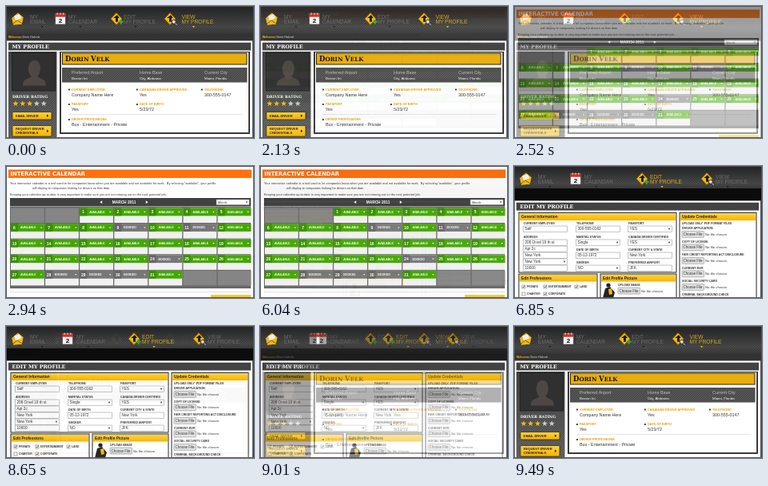
Write an HTML page that moves like this. It is 310 px wide and 165 px high and loops after 9520 ms.

```html
<!DOCTYPE html>
<html lang="en">
<head>
<meta charset="utf-8">
<title>Driver portal</title>
<style>
html, body { margin: 0; width: 100%; height: 100%; overflow: hidden; background: #fff; }
svg { display: block; width: 100vw; height: 100vh; }
text { font-family: Arial, "Liberation Sans", sans-serif; white-space: pre; }
.b { font-weight: bold; }
.slab { font-family: "DejaVu Serif", "Noto Serif", serif; font-weight: bold; }
.wide { font-family: "DejaVu Sans", sans-serif; font-weight: bold; }
</style>
</head>
<body>
<svg id="stage" viewBox="0 0 310 165" preserveAspectRatio="none"></svg>
<script>
const GOLD = '#f5b810', INK = '#333';

const rect = (x, y, w, h, fill, extra = '') =>
  `<rect x="${x}" y="${y}" width="${w}" height="${h}" fill="${fill}" ${extra}/>`;
const path = (d, fill, extra = '') => `<path d="${d}" fill="${fill}" ${extra}/>`;
const esc = s => String(s).replace(/&/g, '&amp;');
// Text is placed by its left edge and the middle of its capitals.
const text = (x, y, size, s, fill = INK, cls = '', extra = '') =>
  `<text x="${x}" y="${y + size * .36}" font-size="${size}" fill="${fill}" class="${cls}" ${extra}>${esc(s)}</text>`;
const label = (x, y, s, fill = INK, size = 3.6) => text(x, y, size, s, fill, 'b');
const arrow = (x, y, size, fill, turn = 0) =>
  path(`M${-size} ${-size * .6}H${size}L0 ${size * .8}Z`, fill, `transform="translate(${x} ${y}) rotate(${turn})"`);

const defs = `<defs>
  <linearGradient id="head" x2="0" y2="1">
    <stop stop-color="#242424"/><stop offset=".75" stop-color="#4a4a4a"/><stop offset="1" stop-color="#3a3a3a"/>
  </linearGradient>
  <linearGradient id="gold" x2="0" y2="1"><stop stop-color="#ffd23c"/><stop offset="1" stop-color="#f5b400"/></linearGradient>
  <linearGradient id="slate" x2="0" y2="1"><stop stop-color="#444"/><stop offset="1" stop-color="#666"/></linearGradient>
  <pattern id="mesh" width="3" height="3" patternUnits="userSpaceOnUse">
    <path d="M0 3L3 0" stroke="#000" stroke-opacity=".28" stroke-width=".7"/>
  </pattern>
  <pattern id="weave" width="2" height="2" patternUnits="userSpaceOnUse">
    <path d="M0 .5H2" stroke="#fff" stroke-opacity=".18" stroke-width=".6"/>
  </pattern>
</defs>`;

const textured = (x, y, w, h, fill, pattern = 'mesh') => rect(x, y, w, h, fill) + rect(x, y, w, h, `url(#${pattern})`);
const outline = rect(.5, .5, 309, 164, 'none', 'stroke="#555"');

const icons = {
  mail: path('M-7 -1L1 -8L8 -2L6 7L-5 8Z', '#ddb62c') + path('M-4 -4L3 -6L6 -1L-2 3Z', '#f5f0df') +
    path('M-7 -1L0 3L8 -2L6 7L-5 8Z', GOLD) + path('M-6 7L0 2L6 6', 'none', 'stroke="#5a4300" stroke-width=".8"'),
  calendar: rect(-6.5, -7, 13, 14, '#f4f4f4') + rect(-6.5, -7, 13, 4.5, '#d22a22') +
    path('M-4 -8V-5M0 -8V-5M4 -8V-5', 'none', 'stroke="#ddd"') +
    text(0, 2.4, 8.5, '2', '#111', 'b', 'text-anchor="middle"'),
  sign: path('M0 -8L7.5 0L0 8L-7.5 0Z', GOLD, 'stroke="#6d5205" stroke-width=".7"') +
    path('M-1 4V-1L-4 -1L1 -5L4 -1H2V4Z', '#191919')
};
const badge = {
  edit: path('M3 4H9M6 1V7', 'none', 'stroke="#39a935" stroke-width="2.2"'),
  view: '<circle cx="5" cy="4" r="2.6" fill="#ddd" stroke="#333"/>' + path('M7 6L9 8', 'none', 'stroke="#eee"')
};

function menu(y, active, spots) {
  const items = [
    ['MY', 'EMAIL', icons.mail], ['MY', 'CALENDAR', icons.calendar],
    ['EDIT', 'MY PROFILE', icons.sign + badge.edit], ['VIEW', 'MY PROFILE', icons.sign + badge.view]
  ];
  return items.map(([top, bottom, icon], i) => {
    const [iconX, textX] = spots[i], on = i === active, fill = on ? '#d9a916' : '#6a6a6a';
    return `<g transform="translate(${iconX} ${y}) scale(.95)">${icon}</g>` +
      text(textX, y - 2.8, 6.6, top, fill) + text(textX, y + 3.2, 6.6, bottom, fill) +
      arrow(textX + 15, y + 10, 1.6, on ? GOLD : '#222');
  }).join('');
}

// White page frame with the dark title strip inside it.
function titleBar(title) {
  return rect(0, 43, 310, 122, '#444') + rect(1, 43.5, 307, 121.5, '#fff') +
    textured(3, 45.7, 303, 9.8, '#484848') + text(7.5, 51, 6.4, title, '#fff', 'slab');
}

function star(x, y, fill) {
  const points = Array.from({ length: 10 }, (_, i) => {
    const r = i % 2 ? 1.6 : 3.8, a = i * Math.PI / 5;
    return `${x + r * Math.sin(a)},${y - r * Math.cos(a)}`;
  });
  return `<polygon points="${points.join(' ')}" fill="${fill}"/>`;
}

function goldButton(y, h, lines) {
  const mid = y + h / 2;
  return rect(8, y, 49, h, 'url(#gold)', 'rx="1" stroke="#222" stroke-width=".7"') +
    lines.map((line, i) => label(12, mid + (i - (lines.length - 1) / 2) * 5, line, '#222', 4)).join('') +
    arrow(52, mid, 1.7, '#222', -90);
}

function profileScene() {
  let s = textured(0, 0, 310, 35, 'url(#head)') + textured(0, 34.5, 310, 9, '#363636') +
    menu(16, 3, [[14, 30], [68, 78], [138, 147], [205, 219.5]]) +
    label(3, 39, 'Welcome:', GOLD, 3.6) + text(20.5, 39, 3.7, 'Derin Halvott', '#ddd') +
    titleBar('MY PROFILE') + textured(3, 57, 60.5, 108, 'url(#slate)');

  s += rect(7.5, 58.5, 54, 47.5, '#303030', 'stroke="#222"') +
    path('M21 99.5C21 90 28 92 31.5 88C26 82 27 68 35.5 68C44 68 45 82 39.5 88C43 92 50 90 50 99.5Z', '#4e4744') +
    text(8, 113.5, 4.7, 'DRIVER RATING', '#fff', 'slab');
  for (let i = 0; i < 5; i++) s += star(12 + i * 8.8, 122, i < 3 ? GOLD : '#ccc');
  s += goldButton(132.5, 9.5, ['EMAIL DRIVER']) + goldButton(149.5, 13.5, ['REQUEST DRIVER', 'CREDENTIALS']);

  s += rect(67, 57, 238, 103, '#3a3a3a') + rect(69, 58, 234, 100, '#fff') +
    rect(70.5, 59, 230.5, 14, '#e8ae0c', 'stroke="#222"') +
    `<text x="74" y="69.2" font-size="7.2" fill="#111" class="slab"><tspan font-size="8.5">D</tspan>ORIN <tspan font-size="8.5">V</tspan>ELK</text>` +
    textured(70, 77, 231.5, 18.5, '#555');
  const columns = [82, 167, 248];
  [['Preferred Airport', 'Boston Int'], ['Home Base', 'City, Alabama'], ['Current City', 'Miami, Florida']]
    .forEach(([head, value], i) => {
      s += text(columns[i], 83.2, 5.4, head, '#c0c0c0') + text(columns[i], 90, 4.4, value, '#fff');
    });
  [[0, 104.5, 'CURRENT EMPLOYER', 'Company Name Here'], [1, 104.5, 'CANADIAN DRIVER APPROVED', 'Yes'],
   [2, 104.5, 'TELEPHONE', '300-555-0147'], [0, 123, 'PASSPORT', 'Yes'], [1, 123, 'DATE OF BIRTH', '5/23/72'],
   [0, 142, 'DRIVER PROFESSIONS', 'Bus - Entertainment - Private']].forEach(([c, y, head, value]) => {
    const x = columns[c];
    s += rect(x - 4, y - .9, 1.8, 1.8, '#222') + label(x, y, head, '#dda300', 3.9) + text(x, y + 6.5, 5.4, value);
  });
  return s + rect(78, 135.5, 218, .5, '#ccc') + outline;
}

function calendarScene() {
  const booked = [9, 11, 24, 28, 29, 30];
  let s = rect(0, 0, 310, 165, '#fff') + textured(3, 4.5, 304, 10.5, '#ff6900', 'weave') +
    text(5.5, 9.8, 6.8, 'INTERACTIVE CALENDAR', '#fff', 'wide') +
    text(5, 22, 3.9, 'Your interactive calendar is a tool used to let companies know when you are available and not available for work.  By selecting "available", your profile') +
    text(33, 27.8, 3.9, 'will display to companies looking for drivers on that date.') +
    text(5, 36, 3.9, 'Keeping your calendar up-to-date is very important to make sure you are not missing out on the next potential job.') +
    rect(5, 40, 301, 10.5, '#414141') + text(147.5, 45.2, 4.8, 'MARCH 2011', '#fff', 'b', 'text-anchor="middle"') +
    arrow(119, 45.2, 2, '#fff', 90) + arrow(176, 45.2, 2, '#fff', -90) +
    rect(263, 42, 41, 6.5, '#fff', 'stroke="#999" stroke-width=".5"') + text(265, 45.2, 4, 'March') + arrow(301, 45.2, 1.2, '#333') +
    rect(5, 51, 301, 102, '#686868');
  for (let cell = 0; cell < 35; cell++) {
    const day = cell - 1, x = 6 + cell % 7 * 43.1, y = 52.5 + Math.floor(cell / 7) * 19.6;
    if (day < 1 || day > 31) { s += rect(x, y, 41.8, 18.5, '#858585'); continue; }
    const busy = booked.includes(day);
    s += rect(x, y, 41.8, 18.5, '#f1f1f1') + rect(x, y, 41.8, 9.8, busy ? '#777' : '#43a800') +
      rect(x, y, 9, 9.8, busy ? '#666' : '#389000') +
      text(x + 4.5, y + 5, 5, day, '#fff', 'b', 'text-anchor="middle"') +
      label(x + 12, y + 5, busy ? 'BOOKED' : 'AVAILABLE', '#fff', 3.5) + arrow(x + 38, y + 5, 1.2, '#fff');
  }
  return s + rect(5, 157, 301, .6, '#ccc') + rect(256, 161, 50, 4, 'url(#gold)') + outline;
}

function field(x, y, w, value, select) {
  return rect(x, y, w, 7.2, '#fff', 'stroke="#888" stroke-width=".5"') + text(x + 2, y + 3.7, 4.7, value) +
    (select ? arrow(x + w - 3.5, y + 3.6, 1.3, '#333') : '');
}
function fileRow(x, y) {
  return rect(x, y, 27.5, 8, '#e2e2e2', 'rx="1" stroke="#888" stroke-width=".6"') +
    text(x + 1.6, y + 4, 4.5, 'Choose File') + text(x + 29, y + 4, 4.3, 'No file chosen');
}
function panel(x, y, w, h, title) {
  return rect(x, y, w, h, '#fff', 'stroke="#222"') + rect(x + 1, y + 1, w - 2, 8.5, 'url(#gold)') + label(x + 3, y + 5.2, title, '#222', 4.8);
}

function editScene() {
  let s = textured(0, 0, 310, 29, 'url(#head)') + rect(0, 28, 310, 15.5, '#0b0b0b') +
    menu(16, 2, [[14, 30], [77, 88], [160, 170], [241, 252]]) + titleBar('EDIT MY PROFILE') +
    panel(6, 58.5, 197, 74.5, 'General Information') +
    panel(207, 58.5, 96, 108, 'Update Credentials') + panel(6, 135, 98, 32, 'Edit Professions') +
    panel(108, 135, 95, 32, 'Edit Profile Picture');

  [[12, 72, 'CURRENT EMPLOYER', 'Self'], [78, 72, 'TELEPHONE', '300-555-0162'], [143, 72, 'PASSPORT', 'YES', 1],
   [12, 89, 'ADDRESS', '208 Orvel 19 th st'], [78, 89, 'MARITAL STATUS', 'Single', 1], [143, 89, 'CANADA DRIVER CERTIFIED', 'YES', 1],
   [78, 105, 'DATE OF BIRTH', '05-12-1972'], [143, 105, 'CURRENT CITY & STATE', 'New York'],
   [78, 121, 'SMOKER', 'NO', 1], [143, 121, 'PREFERRED AIRPORT', 'JFK']].forEach(([x, y, head, value, select]) => {
    s += label(x, y, head) + field(x - .5, y + 3, 55, value, select);
  });
  ['Apt 2c', 'New York', 'New York', '10000'].forEach((value, i) => {
    s += field(11.5, 100 + i * 8, 55, value, i === 2);
  });

  [[10, 151, 'PRIVATE', 1], [37, 151, 'ENTERTAINMENT', 1], [76, 151, 'LAND', 1],
   [10, 160, 'CHARTER', 0], [37, 160, 'CORPORATE', 1]].forEach(([x, y, name, on]) => {
    s += rect(x, y - 2, 4, 4, '#fff', 'stroke="#777" stroke-width=".6"') + label(x + 6, y, name, INK, 3.4) +
      (on ? path(`M${x + .8} ${y}l1 1l1.6 -2.4`, 'none', 'stroke="#222" stroke-width=".7"') : '');
  });
  s += '<circle cx="118" cy="149" r="2.6" fill="#222"/>' + path('M111 165L114 153L120 151L126 158L124 165Z', '#222') +
    path('M118 154L122 153L123 160L119 161Z', GOLD) + label(130, 149, 'UPLOAD IMAGE') + fileRow(130, 152);

  s += label(210, 72, 'UPLOAD ONLY .PDF FORMAT FILES');
  ['DRIVER APPLICATION', 'COPY OF LICENSE', 'FAIR CREDIT REPORTING ACT DISCLOSURE', 'CURRENT MVR',
   'SOCIAL SECURITY CARD', 'CRIMINAL BACKGROUND CHECK'].forEach((name, i) => {
    const y = 78 + i * 16.5;
    s += label(210, y, name) + fileRow(210, y + 3.3);
  });
  return s + outline;
}

const stage = document.getElementById('stage');
stage.innerHTML = defs + [profileScene, calendarScene, editScene].map(draw => `<g>${draw()}</g>`).join('');
const scenes = [...stage.querySelectorAll(':scope > g')];

const LOOP = 9520, STEP = 30;
const fades = [
  { start: 2130, steps: 28, from: 0, to: 1 },
  { start: 6040, steps: 28, from: 1, to: 2 },
  { start: 8650, steps: 29, from: 2, to: 0 }
];

function render(time) {
  const t = time % LOOP;
  const fade = fades.filter(f => t >= f.start).pop();
  const mix = fade ? Math.min(1, (Math.floor((t - fade.start) / STEP) + 1) / fade.steps) : 1;
  const { from, to } = fade || { from: 0, to: 0 };
  // The scene painted later carries the opacity; the one below stays solid.
  const upper = Math.max(from, to);
  scenes.forEach((scene, i) => {
    const shown = i === from || i === to;
    scene.style.display = shown ? '' : 'none';
    scene.style.opacity = from !== to && i === upper ? (upper === to ? mix : 1 - mix) : 1;
  });
}

const begun = performance.now();
function tick() {
  render(performance.now() - begun);
  requestAnimationFrame(tick);
}
render(0);
requestAnimationFrame(tick);
</script>
</body>
</html>
```
